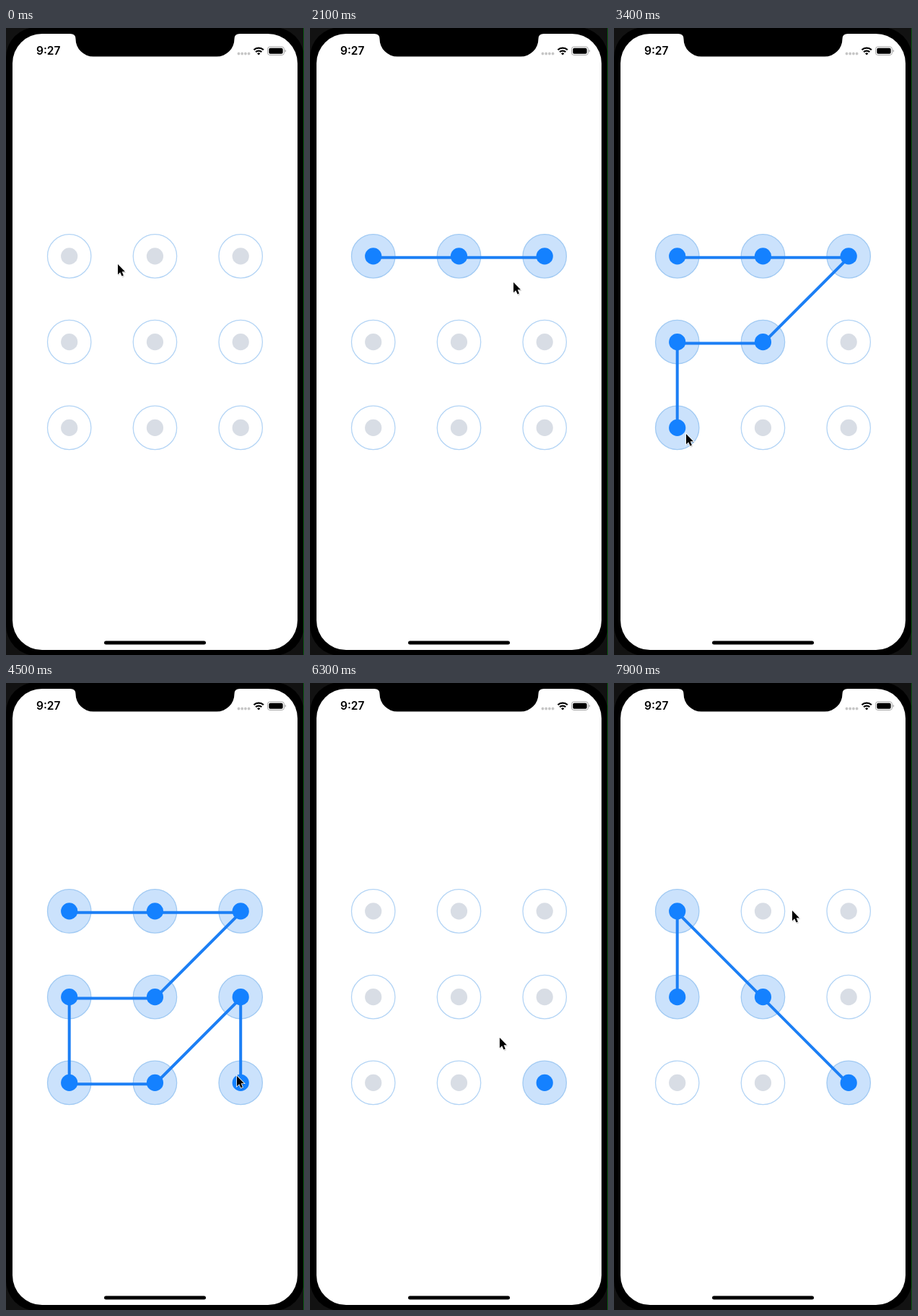
These frames come from a looping animation (413x868 px, 8 s). An HTML page:

```html
<!DOCTYPE html>
<html lang="en">
<head>
<meta charset="utf-8">
<title>Pattern lock</title>
<style>
  html, body { margin: 0; width: 100%; height: 100%; overflow: hidden; background: #000; }
  svg { display: block; width: 413px; height: 868px; }
  .time { font: 600 15.5px Inter, "Liberation Sans", sans-serif; }
  .ring { fill: #fff; stroke: #b3d4f5; stroke-width: 1.3; }
  .ring.on { fill: #cbe2fc; stroke: #a1caf3; }
  .dot { fill: #d8dde5; }
  .dot.on { fill: #1481ff; }
  #links { fill: none; stroke: #1c7ff5; stroke-width: 4; }
  .arrow { stroke: #fff; stroke-width: 1.6; paint-order: stroke; }
</style>
</head>
<body>
<svg viewBox="0 0 413 868">
  <rect width="413" height="868" fill="#121212"/>
  <rect y="-1" width="413" height="870" rx="42"/>
  <rect x="412" width="1" height="868" fill="#0b5a12"/>
  <rect x="9" y="8" width="395" height="853" rx="41" fill="#fff"/>
  <path d="M89 7V8Q96.500 8 96.500 15A24.500 24.500 0 0 0 121 39.500H292A24.500 24.500 0 0 0 316.500 15Q316.500 8 324 8V7Z"/>

  <text class="time" x="42" y="37">9:27</text>
  <path d="M322.500 35.500h15" stroke="#c6c6c6" stroke-width="3.800" stroke-linecap="round" stroke-dasharray="0 4.700"/>
  <g fill="none" stroke="#000" stroke-width="2.300">
    <path d="M343.500 30.300a9.600 9.600 0 0 1 13.400 0"/>
    <path d="M346.100 33.200a5.900 5.900 0 0 1 8.200 0"/>
    <path d="M350.200 37.500l-2.200-2.200a3.200 3.200 0 0 1 4.400 0Z" fill="#000" stroke="none"/>
  </g>
  <rect x="362.500" y="26" width="23" height="11.500" rx="3.300" fill="#fff" stroke="#a5a5a5"/>
  <rect x="364.300" y="27.800" width="19.400" height="7.900" rx="1.900"/>
  <path d="M386.700 29.800q1.400 .600 1.400 2t-1.400 2Z" fill="#a5a5a5"/>
  <rect x="136" y="848.500" width="141" height="5" rx="2.500"/>

  <g id="rings"></g>
  <path id="links"/>
  <g id="dots"></g>
  <g id="cursor">
    <path d="M.500 1V16L4 13L6.400 18.400L9.200 17.200L7 12H11.500Z" opacity=".18"/>
    <path class="arrow" d="M0 0V14.200L3.200 11.200L5.600 16.500L7.900 15.500L5.700 10.300H10Z"/>
  </g>
</svg>
<script>
  const LOOP = 8000, STEP = 100;
  const byId = id => document.getElementById(id);

  // Nodes are numbered 0 to 8, row by row.
  const nodes = Array.from({ length: 9 }, (_, i) => ({
    x: 87.7 + 118.75 * (i % 3),
    y: 315.9 + 118.75 * Math.floor(i / 3)
  }));

  // A drag visits its nodes at an even pace and clears the one before.
  const visit = (order, start, pace) =>
    [...order].map((n, i) => ({ t: start + pace * i, node: +n, ...nodes[n] }));
  const drags = [visit("012436758", 920, 440), visit("8403", 6090, 400)];

  // Where the pointer strays from the nodes.
  const strays = [
    [0, 155, 327], [2100, 282, 352], [3400, 100, 562], [4500, 320, 544],
    [5800, 308, 547], [6900, 100, 320], [7900, 247, 315]
  ].map(([t, x, y]) => ({ t, x, y }));
  const track = [...drags.flat(), ...strays].sort((a, b) => a.t - b.t);

  function addCircles(name, r) {
    return nodes.map(({ x, y }) => {
      const c = document.createElementNS("http://www.w3.org/2000/svg", "circle");
      const attrs = { cx: x, cy: y, r, class: name };
      for (const key in attrs) c.setAttribute(key, attrs[key]);
      byId(name + "s").append(c);
      return c;
    });
  }
  const rings = addCircles("ring", 30.2);
  const dots = addCircles("dot", 11.6);

  function pointer(t) {
    const b = track.find(p => p.t > t) || track.at(-1);
    const a = track[track.indexOf(b) - 1];
    const u = Math.min(1, (t - a.t) / (b.t - a.t));
    return [a.x + (b.x - a.x) * u, a.y + (b.y - a.y) * u];
  }

  function draw(t) {
    const drag = drags.filter(d => d[0].t <= t).pop() || [];
    const hit = drag.filter(v => v.t <= t);
    nodes.forEach((_, i) => {
      const on = hit.some(v => v.node === i);
      rings[i].classList.toggle("on", on);
      dots[i].classList.toggle("on", on);
    });
    // Links sit a little below the node centres.
    const points = hit.map(v => `${v.x} ${v.y + 1.8}`);
    byId("links").setAttribute("d", points.length ? "M" + points.join("L") : "");
    byId("cursor").setAttribute("transform", `translate(${pointer(t)})`);
  }

  const start = performance.now();
  function tick() {
    const t = (performance.now() - start) % LOOP;
    draw(Math.floor(t / STEP) * STEP);
    requestAnimationFrame(tick);
  }
  draw(0);
  requestAnimationFrame(tick);
</script>
</body>
</html>
```
